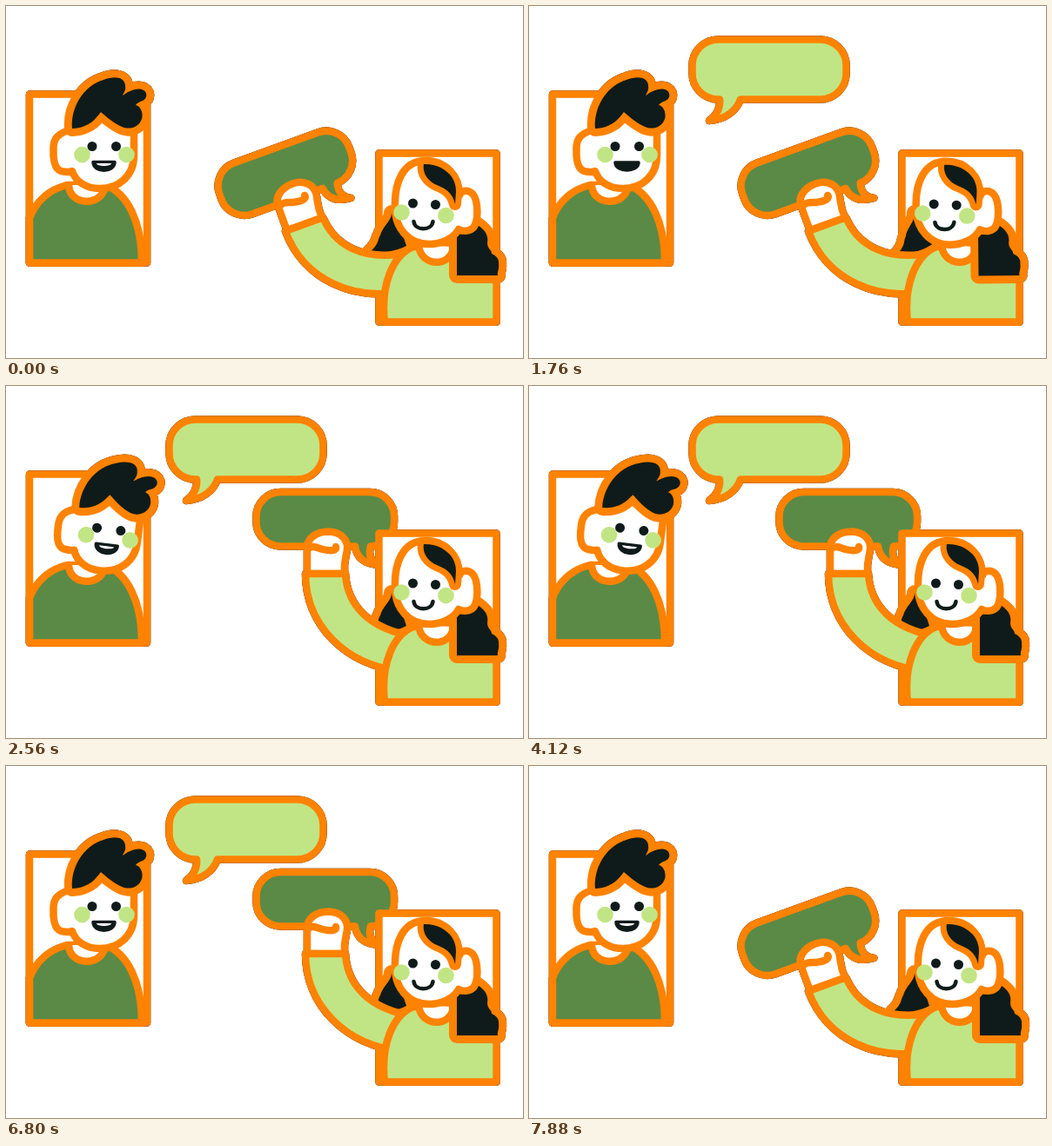
Recreate the animation shown at these times as an HTML page. Size 594 px wide and 405 px high, loop 8000 ms.

```html
<!DOCTYPE html>
<html lang="en">
<head>
<meta charset="utf-8">
<title>Conversation</title>
<style>
  html, body { margin: 0; width: 100%; height: 100%; overflow: hidden; background: #fff; }
  svg { display: block; width: 594px; height: 405px; filter: drop-shadow(.4px .4px .4px #000); }
  .line { stroke: #ff8200; stroke-width: 8.5; stroke-linejoin: round; stroke-linecap: round; fill: none; }
  .white { fill: #fff; }
  .light { fill: #c1e584; }
  .green { fill: #5b8a46; }
  .dark { fill: #0f1b1a; }
  .hair { fill: #0f1b1a; stroke: #ff8200; stroke-width: 18; stroke-linejoin: round; paint-order: stroke; }
  .lock { stroke-width: 14; }
  #lips { stroke: #0f1b1a; stroke-width: 3.5; stroke-linejoin: round; }
  .smile { fill: none; stroke: #0f1b1a; stroke-width: 4.5; stroke-linecap: round; }
</style>
</head>
<body>
<svg viewBox="0 0 594 405">
  <!-- Man -->
  <rect class="line white" x="27" y="101.5" width="135" height="194"/>
  <path class="line green" d="M27 244C35 224 50 211 70 206H115C140 217 156 248 156 295.500H27Z"/>
  <path class="line white" d="M72 206C73 231 112 231 114 206"/>
  <g id="manHead">
    <path class="line white" d="M76 142C60 146 54 152 54.500 165C54 181 58 190 66 190.500Q72 191.500 76 190C80 202 92 210 108 210C130 210 147 195 147 172V125H85Z"/>
    <path class="hair" d="M76 141C74 118 88 92 112 85C125 80 137 82 137 92C138 97 135 100 134 103C140 99 148 94 156 96C163 98 163 106 157 109Q151 111 149 114C155 115 158 124 156 130C152 141 140 143 131 138C121 133 114 126 109 122C104 128 97 140 76 141Z"/>
    <circle class="light" cx="87.500" cy="171" r="9.300"/>
    <circle class="light" cx="138.500" cy="171" r="9.300"/>
    <g class="dark" id="manEyes">
      <ellipse cx="99" cy="161.500" rx="5.500"/>
      <ellipse cx="126.500" cy="161.500" rx="5.500"/>
    </g>
    <path class="dark" id="lips"/>
    <path class="white" id="teeth"/>
  </g>

  <!-- Woman -->
  <path class="line green arm" d="M315.500 122H418a28 28 0 0 1 28 28V156.500a28 28 0 0 1-27 28C416 195 420 202 428 206C412 205 403 198 401 184.500H315.500a28 28 0 0 1-28-28V150a28 28 0 0 1 28-28Z"/>
  <rect class="line white" x="428.500" y="169.500" width="135" height="194"/>
  <path class="hair" id="leftHair" d="M443 238C443 248 432 254 430 264C427 268 429 274 418 283C432 285 448 282 460 276L450 245Z"/>
  <g class="arm">
    <path class="line white" d="M346 216V190C344 174 358 167.500 371 167.500C386 168 393 178 392 188C391 197 388 200 389 216Z"/>
    <path class="line" stroke-width="7" d="M347 187C353 183 357 186 364 188C372 190 380 190 379 185"/>
    <path class="line light" d="M344 216H390C392 250 415 280 470 288L455 328C390 322 344 275 344 216Z"/>
  </g>
  <path class="line light" d="M435 363.500C430 320 445 286 468 277H520C545 285 563.500 300 563.500 320V363.500Z"/>
  <path class="line white" d="M474 275C476 301 512 301 514 277"/>
  <g id="womanHead">
    <path class="hair" d="M518 310V262C530 264 537 258 539 250C548 256 555 262 553 272C553 280 558 280 558 285C562 287 567 290 566 297C567 303 564 306 565 310Z"/>
    <path class="line white" d="M447 232C446 205 455 178 482 178C505 178 521 195 521 218C522 213 530 210 536 216C543 224 543 247 537 255C533 259 526 260 520 257C514 268 500 274 486 274C462 274 447 255 447 232Z"/>
    <path class="hair lock" d="M480 182C497 181 517 192 517 213L516 228C513 215 505 210 495 206C485 202 478 192 480 182Z"/>
    <circle class="light" cx="454.500" cy="237.500" r="9.300"/>
    <circle class="light" cx="505.500" cy="241" r="9.300"/>
    <g class="dark" id="womanEyes">
      <ellipse cx="467.500" cy="227" rx="5.500"/>
      <ellipse cx="493.500" cy="228.500" rx="5.500"/>
    </g>
    <path class="smile" d="M468.500 248C470 259 489 259 490.500 248"/>
  </g>

  <path class="line light" id="speech" d="M219 107.500H217.500a30 30 0 0 1-30-30V68.500a30 30 0 0 1 30-30H334.500a30 30 0 0 1 30 30V77.500a30 30 0 0 1-30 30H243C239 119 227 131 207 132C215 126 220 118 219 107.500Z"/>
</svg>
<script>
const LOOP = 8000, STEP = 40;
const $ = id => document.getElementById(id);
const arms = document.querySelectorAll('.arm');
const place = (el, transform) => el.setAttribute('transform', transform);

const clamp = x => Math.min(1, Math.max(0, x));
const part = (t, from, to) => clamp((t - from) / (to - from));
const ease = u => u < .5 ? 4 * u ** 3 : 1 - 4 * (1 - u) ** 3;
const ramp = (t, from, to) => ease(part(t, from, to));
const mix = (a, b, k) => a.map((v, i) => v + (b[i] - v) * k);

// Mouth poses: left, right, corner height, upper bulge, lower bulge
const mouths = {
  grin:  { lips: [100, 125, 179.5, 0, 13],  teeth: [104, 121, 181, 0, 4] },
  laugh: { lips: [99, 126, 180, 0, 12],     teeth: [112, 113, 181, 0, 0] },
  round: { lips: [105, 124, 182.3, 8.3, 8.7], teeth: [107.5, 121, 182.2, 4.8, 4.8] }
};
const mouthPath = ([l, r, y, up, down]) =>
  `M${l} ${y}C${l} ${y - up} ${r} ${y - up} ${r} ${y}C${r} ${y + down} ${l} ${y + down} ${l} ${y}Z`;

function drawMouth(t) {
  const laugh = ramp(t, 0, 1080) - ramp(t, 2040, 2560);
  const talk = t > 120 && t < 1080 ? Math.sin(Math.PI * (t - 120) / 240) ** 2 : 0;
  for (const id of ['lips', 'teeth']) {
    const smile = mix(mouths.grin[id], mouths.laugh[id], laugh);
    $(id).setAttribute('d', mouthPath(mix(smile, mouths.round[id], talk)));
  }
}

function blink(id, t, from, to) {
  const open = 1 - .9 * Math.sin(Math.PI * part(t, from, to)) ** 2;
  for (const eye of $(id).children) eye.setAttribute('ry', 5.5 * open);
}

function draw(t) {
  const raised = ramp(t, 2040, 2560) - ramp(t, 7360, 7880);
  arms.forEach(el => place(el, `rotate(${-20 * (1 - raised)} 454.500 303)`));

  const tilt = ramp(t, 2040, 2560) - ramp(t, 6280, 6800);
  place($('manHead'), `rotate(${7 * tilt} 88 208)`);

  const nod = Math.abs(Math.sin(2 * Math.PI * part(t, 1200, 1840)));
  place($('womanHead'), `translate(${-2.6 * nod} ${nod}) rotate(${-.8 * nod} 490 275)`);
  place($('leftHair'), `rotate(${-9 * nod} 445 240)`);

  const size = 1.032 * ramp(t, 0, 480) - .032 * ramp(t, 480, 840) - ramp(t, 7160, 7640);
  place($('speech'), `translate(214.500 128) scale(${size}) translate(-214.500 -128)`);
  $('speech').style.display = size > .005 ? '' : 'none';

  drawMouth(t);
  blink('manEyes', t, 3600, 4120);
  blink('womanEyes', t, 4800, 5240);
}

const start = performance.now();
function tick() {
  const t = (performance.now() - start) % LOOP;
  draw(Math.floor(t / STEP) * STEP);
  requestAnimationFrame(tick);
}
tick();
</script>
</body>
</html>
```
